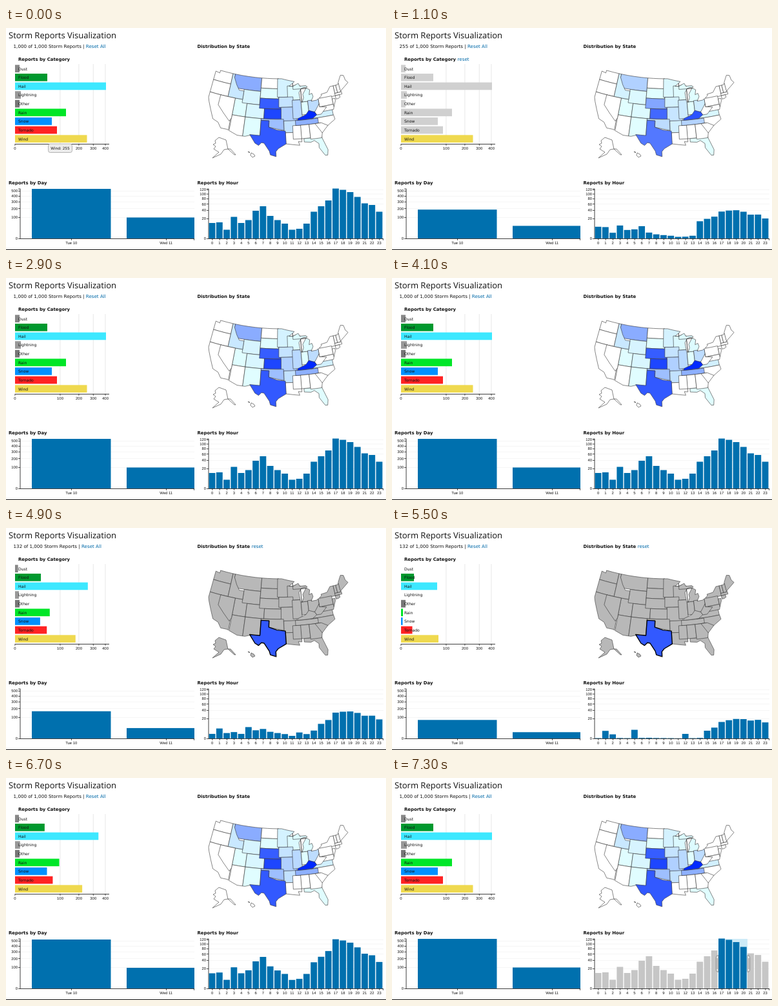
An HTML page with a canvas that plays this animation: 589 by 345 pixels, repeating every 8000 ms.

```html
<!DOCTYPE html>
<html lang="en">
<head>
<meta charset="utf-8">
<title>Storm Reports Visualization</title>
<style>
  html, body { margin: 0; width: 100%; height: 100%; overflow: hidden; background: #fff; }
  canvas { display: block; }
</style>
</head>
<body>
<canvas id="stage" width="589" height="345"></canvas>
<script>
const ctx = document.getElementById('stage').getContext('2d');
const BODY = '"DejaVu Sans", sans-serif', AXIS = '"Liberation Sans", Arial, sans-serif';
const INK = '#111', LINK = '#0069a8', BAR = '#0070ae', FADED = '#c6c6c6';

// Outline of the country as west longitude and latitude pairs.
const coast = `124.7 48.4 122.8 48.2 122.8 49 95.2 49 93 48.6 89.6 48 92 46.7 90.4 46.6 88 47.4 87.4 46.5
  84.8 46.5 84.2 46 86 46 87 45.7 88 44.6 87.7 42 87 41.7 86.3 43 86.5 44 84.8 45.8 83.4 45.1 83.9 43.7
  82.7 44 82.4 43 83.4 41.7 81.2 41.8 79 42.8 79 43.3 76.5 43.5 74.8 45 71.5 45 70 46.7 69.2 47.5 68 47.2
  67.8 45.7 67 44.8 70.7 43.1 70.7 42 70 41.8 73.9 40.6 75 38.9 75.9 37 75.6 35.3 78.6 33.9 81 32
  81.4 30.7 80 26.8 80.4 25.2 81.2 25.3 82.8 27.8 82.7 29 84.1 30.1 85.3 29.7 89.6 30.2 89.2 29.1
  93.8 29.7 106.5 31.8 108.2 31.3 111 31.3 114.8 32.5 117.1 32.5 118.5 34 120.6 34.6 123.8 39.3 124.4 40.4`;

// Straight-sided states, stacked from the north: west, east, top, then each name with its southern edge.
const stacks = `124.8 117 49 WA 45.8 OR 42
124.8 114.3 42 CA 32
116 104 49 MT 45
114 109 42 UT 37 AZ 31.3
111 104 45 WY 41
109 102 41 CO 37
109 103 37 NM 31.3
104 96.5 49 ND 46 SD 43
104 95.6 43 NE 40
102 94.6 40 KS 37
97 89 49.4 MN 43.5
92.8 87 46.8 WI 42.5
96.4 90.6 43.5 IA 40.5
95.5 89.6 40.5 MO 36.4
94.5 90 36.5 AR 33
94 88.4 33 LA 29
91.3 88.3 35 MS 31
91 87.5 42.5 IL 37
87.5 84.8 41.8 IN 38
87.2 82.3 45.7 MI 41.8
90.4 83.9 47.5 MI 45.7
79.8 73.4 45.1 NY 42
80.5 75 42.2 PA 39.7
75 73.9 41.3 NJ 38.9
83.6 75.9 39.2 VA 36.6
79.5 75 39.7 MD 38.2
84.8 80.5 42 OH 38.5
84.3 75.4 36.6 NC 33.8
90.2 81.8 36.5 TN 35
87.6 80 31 FL 25
88.4 85.3 35 AL 31
85.3 81 35 GA 30.6
73.4 72.3 45.1 VT 42.7
72.3 70.9 45.3 NH 42.7
71 66.9 47.6 ME 43
73.5 69.9 42.7 MA 42
73.5 71.8 42 CT 41 `;

// States with slanted or river borders.
const shapes = {
  ID: '117 49 116 49 116 48 114.5 46 113 44.5 111 44.5 111 42 117 42',
  NV: '120 42 114 42 114 36.1 114.6 35 120 39',
  OK: '103 37 94.6 37 94.5 33.7 100 34.6 100 36.5 103 36.5',
  SC: '83.1 35 80.8 35 78.6 33.9 81 32',
  WV: '82.6 38.4 80.5 40.6 80.5 39.7 77.8 39.3 80.3 37.5 82 37.5',
  KY: '89.2 37 86 38 84.8 39.1 82.6 38.4 82 37.5 83.7 36.6 89.4 36.5',
  TX: `103 36.5 100 36.5 100 34.6 97 33.8 94 33.5 93.8 29.7 96.5 28.3 97.3 27.4 97.2 25.9 99.1 26.4
    99.5 27.5 101.4 29.8 102.3 29.9 103.2 29 104.5 29.6 106.6 32 103 32`,
};

// Share of the busiest state's reports; states not listed have none.
const shares = {
  KY: 1, KS: .87, TX: .78, NE: .76, MT: .39, TN: .37, OK: .3, MO: .22, IL: .18, OH: .16, AR: .14, IA: .13,
  ID: .11, VA: .07, MN: .06, WY: .05, CO: .04, WI: .03, MI: .02, UT: .01, NM: .01, SD: .01, IN: .01, FL: .01,
};

function parsePoints(str) {
  const n = str.trim().split(/\s+/).map(Number);
  return Array.from({ length: n.length / 2 }, (_, i) => [n[2 * i], n[2 * i + 1]]);
}

// Keeps the part of a polygon where sign * (coordinate - limit) >= 0.
function clip(points, axis, limit, sign) {
  return points.flatMap((b, i) => {
    const a = points.at(i - 1);
    const da = sign * (a[axis] - limit), db = sign * (b[axis] - limit);
    const u = da / (da - db);
    const cross = [a[0] + u * (b[0] - a[0]), a[1] + u * (b[1] - a[1])];
    return [...(da >= 0 !== db >= 0 ? [cross] : []), ...(db >= 0 ? [b] : [])];
  });
}

// Albers equal-area conic projection, parallels 29.5 and 45.5.
function project(lon, lat) {
  const rad = Math.PI / 180, n = 0.60285;
  const rho = 299.4 * Math.sqrt(1.3512 - 2 * n * Math.sin(lat * rad)) / n;
  const theta = n * (96 - lon) * rad;
  return [424.4 + rho * Math.sin(theta), rho * Math.cos(theta) - 251];
}

function makeState(name, points) {
  const path = new Path2D();
  points.forEach(([x, y], i) => {
    const [px, py] = points.at(i - 1);
    const steps = Math.ceil(Math.abs(x - px) / 3) || 1;
    for (let k = 1; k <= steps; k++) path.lineTo(...project(px + (x - px) * k / steps, py + (y - py) * k / steps));
  });
  path.closePath();
  const all = shares[name] ?? NaN;
  return { name, path, all, texas: all, wind: all * (all > 0.77 ? 0.75 : 0.4) };
}

const land = parsePoints(coast);
const states = [];
for (const line of stacks.trim().split('\n')) {
  let [w, e, top, ...rest] = line.trim().split(' ');
  while (rest.length) {
    const [name, bottom] = rest.splice(0, 2);
    const column = clip(clip(land, 0, w, -1), 0, e, 1);
    states.push(makeState(name, clip(clip(column, 1, top, -1), 1, bottom, 1)));
    top = bottom;
  }
}
for (const [name, str] of Object.entries(shapes)) states.push(makeState(name, parsePoints(str)));
for (const d of [
  'M330 170l11 4 3 14 4 0 8 9 -2 0 -10 -9 -6 1 -5 7 -13 6 10 -9 -8 -5 3 -4 -4 -3 4 -2 -1 -4z',
  'M380 194l4 2 2 3 -4 2 -3 -3z M375 192l3 1 -1 1z',
]) states.push({ path: new Path2D(d), all: NaN });

const categories = [
  // label, colour, bar length unfiltered, bar length for Texas
  ['Dust', '#888', 7, 0], ['Flood', '#00992e', 50, 20], ['Hail', '#3de8ff', 141, 56],
  ['Lightning', '#999', 9, 0], ['Other', '#777', 7, 7], ['Rain', '#00e628', 79, 3],
  ['Snow', '#0090ff', 57, 2.5], ['Tornado', '#ff2323', 65, 17.5], ['Wind', '#efd94f', 111.5, 58],
].map(([label, color, all, texas]) => ({ label, color, all, wind: all, texas }));

const days = [
  { label: 'Tue 10', x: 40, w: 122.5, all: 77, wind: 40, texas: 28.7 },
  { label: 'Wed 11', x: 187, w: 105, all: 32.5, wind: 17.6, texas: 9.7 },
];

// Wind fades over the morning and returns from 14:00; Texas storms build up towards midnight.
function windShare(hour) {
  if (hour < 7) return 0.72 - 0.06 * hour;
  return hour < 14 ? 0.06 : 0.47 + 0.04 * Math.abs(hour - 17);
}
function texasShare(hour) {
  if (hour > 14) return 0.24 + 0.045 * (hour - 15);
  return [1, 2, 5, 12].includes(hour) ? 0.47 : 0.02;
}
const hours = [24, 25, 13.5, 33.5, 24, 28.5, 43, 50, 35, 28.5, 23, 13.5, 15, 23, 41.5, 50, 59, 77.5, 75.5, 72, 64.5, 54.5, 52, 41.5]
  .map((all, hour) => ({ all, wind: all * windShare(hour), texas: all * texasShare(hour) }));
const counts = { all: '1,000', wind: '255', texas: '132' };

const LOOP = 8000;
const pauses = [[100, 700], [1890, 2500], [5700, 6300], [7300, LOOP]];
const filters = [[-5000, 'all'], [589, 'wind'], [1730, 'all'], [4049, 'texas'], [5270, 'all']];

function box(x, y, w, h, color) {
  ctx.fillStyle = color;
  ctx.fillRect(x, y, w, h);
}

function text(str, x, y, size, { color = INK, weight = '', align = 'left', font = BODY } = {}) {
  ctx.font = `${weight} ${size}px ${font}`;
  ctx.textAlign = align;
  ctx.fillStyle = color;
  ctx.fillText(str, x, y);
  return x + ctx.measureText(str).width;
}

const tickText = (str, x, y, align = 'center') => text(str, x, y, 5.9, { align, font: AXIS });

function heading(str, x, y, showReset) {
  const end = text(str, x, y, 6.92, { weight: 'bold' });
  if (showReset) text('reset', end + 2.5, y, 7.1, { color: LINK });
}

function outlined(path, fill, stroke, width) {
  ctx.fillStyle = fill;
  ctx.strokeStyle = stroke;
  ctx.lineWidth = width;
  ctx.fill(path);
  ctx.stroke(path);
}

function roundBox(x, y, w, h, radii, fill, stroke) {
  const path = new Path2D();
  path.roundRect(x, y, w, h, radii);
  outlined(path, fill, stroke, 0.7);
}

function ease(elapsed) {
  const u = Math.min(1, Math.max(0, elapsed / 750));
  return u < 0.5 ? 4 * u ** 3 : 1 - 4 * (1 - u) ** 3;
}

function shade(v) {
  return Number.isNaN(v) ? '#fff' : `rgb(${226 * (1 - v)}, ${255 - 213 * v}, 255)`;
}

function drawRows(view, value) {
  const ticks = [0, 100, 200, 300, 400].map(n => [n, 14 + 7 * Math.sqrt(n)]);
  for (const [n, x] of ticks) if (n) box(x - 0.4, 56, 0.7, 124, '#ddd');
  categories.forEach((row, i) => {
    const y = 57.3 + 13.63 * i, off = view === 'wind' && row.label !== 'Wind';
    box(14, y, value(row), 11.7, off ? '#d0d0d0' : row.color);
    text(row.label, 19, y + 8.2, 6.05);
  });
  box(14, 180, 146, 0.8, INK);
  for (const [n, x] of ticks) {
    box(x - 0.4, 180, 0.7, 3, INK);
    tickText(n, x, 188.6);
  }
}

function drawMap(view, value) {
  ctx.lineJoin = 'round';
  for (const state of states) {
    const selected = view === 'texas' && state.name === 'TX';
    const fill = view === 'texas' && !selected ? '#b8b8b8' : shade(value(state));
    outlined(state.path, fill, selected ? '#000' : '#333', selected ? 1.4 : 0.6);
  }
}

function drawAxis(left, right, ticks, scale) {
  for (const n of ticks) {
    const y = 327 - scale * Math.sqrt(n);
    if (n) box(left, y, right - left, 0.6, '#eee');
    box(left - 3, y, 3, 0.7, INK);
    tickText(n, left - 4, y + 2.2, 'right');
  }
  box(left - 3, 249.7, 3, 0.7, INK);
  box(left - 0.4, 249.7, 0.8, 78, INK);
}

function drawBaseline(left, right) {
  box(left, 327, right - left, 0.8, INK);
  box(right - 0.7, 327, 0.7, 3, INK);
}

function drawBar(x, width, height, color, label) {
  box(x, 327 - height, width, height, color);
  box(x + width / 2, 327, 0.7, 3, INK);
  tickText(label, x + width / 2, 336);
}

function drawDays(value) {
  drawAxis(22, 292, [0, 100, 200, 300, 400, 500], 3.3);
  for (const day of days) drawBar(day.x, 122.5, value(day), BAR, day.label);
  box(292, 249, 18, 78, '#fff');
  drawBaseline(22, 292);
}

function drawHandle(x, side) {
  roundBox(side < 0 ? x - 3.5 : x, 275.7, 3.5, 25.6, side < 0 ? [3, 0, 0, 3] : [0, 3, 3, 0], '#eee', '#666');
  box(x + side * 1.8 - 0.3, 280, 0.6, 17, '#666');
}

function drawHours(value, brushEnd) {
  const brushStart = 506;
  drawAxis(314, 585, [0, 20, 40, 60, 80, 100, 120], 6.93);
  if (brushEnd) box(brushStart, 250, brushEnd - brushStart, 77, '#cdebf7');
  hours.forEach((hour, i) => {
    const x = 314.6 + 11.26 * i;
    const off = brushEnd && (x < brushStart - 1 || x > brushEnd - 5);
    drawBar(x, 9.9, value(hour), off ? FADED : BAR, i);
  });
  drawBaseline(314, 585);
  if (brushEnd) {
    drawHandle(brushStart, -1);
    drawHandle(brushEnd, 1);
  }
}

function drawTooltip() {
  roundBox(65.5, 180, 37, 13.5, 3, '#ececec', '#999');
  text('Wind: 255', 84, 189, 5.8, { align: 'center' });
}

function draw(t) {
  // The screen refreshes every 200 ms and stands still during pauses.
  const pause = pauses.find(([from, to]) => t >= from && t < to);
  const tick = pause ? pause[0] : Math.floor((t + 100) / 200) * 200 - 100;
  const clock = tick - (tick >= 2500 ? 410 : 0) - (tick >= 6300 ? 400 : 0);
  const current = filters.findLastIndex(([start]) => clock >= start);
  const [start, view] = filters[current];
  const previous = current ? filters[current - 1][1] : view;
  const value = lag => item => {
    const p = ease(clock - start - lag);
    return item[previous] * (1 - p) + item[view] * p;
  };

  box(0, 0, 589, 345, '#fff');
  text('Storm Reports Visualization', 4, 16, 13, { font: '"Open Sans", sans-serif' });
  const end = text(`${counts[view]} of 1,000 Storm Reports | `, 11.6, 30.7, 7.12);
  text('Reset All', end, 30.7, 7.12, { color: LINK });
  heading('Reports by Category', 19, 50.6, view === 'wind');
  heading('Distribution by State', 296.5, 30.5, view === 'texas');
  heading('Reports by Day', 4, 242.6);
  heading('Reports by Hour', 296.5, 242.6);

  drawRows(view, value(114));
  drawMap(view, value(60));
  drawDays(value(0));
  drawHours(value(0), tick >= 7300 ? 551 : tick >= 7100 ? 530 : 0);
  if (t < 100) drawTooltip();
  box(0, 344, 589, 1, INK);
}

function frame(now) {
  draw(now % LOOP);
  requestAnimationFrame(frame);
}
ctx.textRendering = 'geometricPrecision';
requestAnimationFrame(frame);
</script>
</body>
</html>
```
